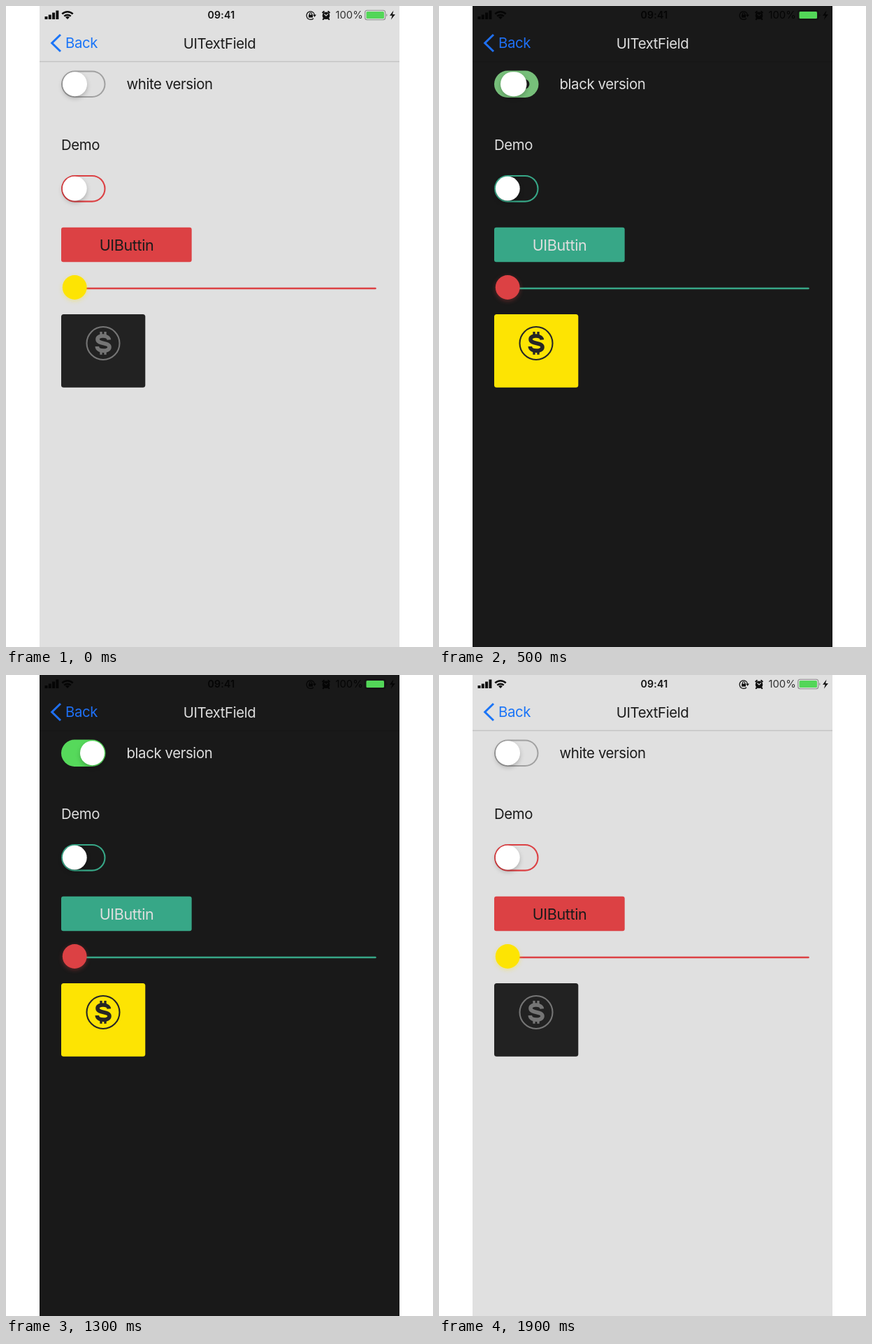
These frames come from a looping animation (611 by 917 pixels, 2 s). An HTML page:

```html
<!DOCTYPE html>
<html lang="en">
<head>
<meta charset="utf-8">
<title>Theme switch</title>
<style>
html, body { margin: 0; width: 100%; height: 100%; overflow: hidden; background: #fff; }
svg {
  display: block;
  --bg: #e0e0e0; --line: #c3c3c3; --ink: #1b1b1b; --link: #1b75f7;
  --accent: #dc4144; --thumb: #fde403; --card: #222; --icon: #757575;
  --status: #111; --percent: #333; --case: #8c8c8c;
}
svg.dark {
  --bg: #191919; --line: #171717; --ink: #dedede; --link: #1f70f5;
  --accent: #37a787; --thumb: #dc4144; --card: #fde403; --icon: #262626;
  --status: #050505; --percent: #050505; --case: #111;
}
text { font: 20.4px Inter, Roboto, sans-serif; letter-spacing: -.4px; fill: var(--ink); }
.mid { text-anchor: middle; }
.page { fill: var(--bg); }
.accent { fill: var(--accent); }
.knob { fill: #fff; filter: drop-shadow(0 3px 3px rgba(0, 0, 0, .22)); }
.thumb { fill: var(--thumb); filter: drop-shadow(0 2px 3px color-mix(in srgb, var(--thumb) 35%, transparent)); }
.status { fill: var(--status); stroke: none; }
.ring { fill: none; stroke: var(--status); }
.icon { fill: none; stroke: var(--icon); }
</style>
</head>
<body>
<svg id="stage" width="611" height="917" viewBox="0 0 611 917">
  <rect class="page" x="48" width="515" height="917"/>
  <path d="M48 79.5H563" stroke="var(--line)" stroke-width="1.4"/>

  <!-- status bar -->
  <path class="status" d="M55.5 15h4v4h-4zM60.8 12.5h4v6.5h-4zM66.1 9.5h4v9.5h-4zM71.4 6.5h4v12.5h-4z"/>
  <g class="ring" stroke-width="2.5">
    <path d="M80.3 11.4A11 11 0 0 1 95.7 11.4M83.3 14.6A6.8 6.8 0 0 1 92.7 14.6"/>
  </g>
  <path class="status" d="M88 19l-2.8-2.8a4 4 0 0 1 5.6 0z"/>
  <text class="mid" x="308" y="18" style="font-size:14.2px;font-weight:600;letter-spacing:.2px;fill:var(--status)">09:41</text>
  <path class="ring" stroke-width="1.3" d="M440 17.7A5.8 5.8 0 1 1 441.6 13"/>
  <path class="status" d="M439 12.6h5l-2.5 3.2zM433 12.6h6v4h-6z"/>
  <path class="ring" stroke-width="1.1" d="M434.3 13v-1.6a1.7 1.7 0 0 1 3.4 0V13"/>
  <circle class="status" cx="458" cy="13.7" r="5.3"/>
  <path class="ring" stroke-width="2.2" stroke-linecap="round" d="M453.3 9.3l1.5-1.3M462.7 9.3l-1.5-1.3M454.8 18l-1 1M461.2 18l1 1"/>
  <path d="M455.5 11.5l2.5 2.4 2.8-2.6" fill="none" stroke="var(--bg)" stroke-width="1.1"/>
  <text x="471.5" y="18" style="font-size:14.8px;letter-spacing:0;fill:var(--percent)">100%</text>
  <rect x="513.7" y="6.2" width="29" height="13.6" rx="3" fill="none" stroke="var(--case)" stroke-width="1.1"/>
  <rect x="515.5" y="8" width="25.5" height="10" rx="1.5" fill="#53d658"/>
  <path d="M544.2 11v4a2.2 2.2 0 0 0 0-4z" fill="var(--case)"/>
  <path class="status" d="M554.5 6.5l-5.5 7.3h3.6l-1.7 5.7 6-7.6h-3.8z"/>

  <!-- navigation -->
  <path d="M78 41L65.7 53 78 65" fill="none" stroke="var(--link)" stroke-width="3"/>
  <text x="85" y="60" style="fill:var(--link)">Back</text>
  <text class="mid" x="305.5" y="60.5">UITextField</text>

  <!-- theme switch -->
  <rect id="track" x="79" y="92.5" width="63.5" height="38.5" rx="19.25"/>
  <rect id="hole" class="page" x="81" y="94.5" width="59.5" height="34.5" rx="17.25"/>
  <rect id="knob" class="knob" y="94.2" height="35" rx="17.5"/>
  <text id="label" x="172.5" y="119"></text>
  <text x="79" y="206">Demo</text>

  <!-- themed controls -->
  <rect class="page" x="80.1" y="243" width="61.4" height="36.6" rx="18.3" stroke="var(--accent)" stroke-width="2.1"/>
  <circle class="knob" cx="98.3" cy="261.2" r="17.4"/>
  <rect class="accent" x="79" y="316.7" width="186.7" height="49.6" rx="3"/>
  <text class="mid" x="172.5" y="349.5" style="font-size:21.6px">UIButtin</text>
  <path d="M98 404H528.5" stroke="var(--accent)" stroke-width="2.6" stroke-linecap="round"/>
  <circle class="thumb" cx="98.2" cy="402.5" r="17.4"/>

  <!-- coin card -->
  <rect x="79" y="441" width="120.3" height="104.7" rx="3.5" fill="var(--card)"/>
  <g class="icon">
    <circle cx="139" cy="482.5" r="23.5" stroke-width="2.1"/>
    <path stroke-width="5.6" d="M147.4 477.5C147 470.8 131 470 131 476.7C131 484.5 148 480.5 148 488C148 495 130.5 495 130.3 487"/>
    <path stroke-width="3.3" d="M136 466v6M142 466v6M136 493v5.7M142 493v5.7"/>
  </g>
</svg>
<script>
const LOOP = 2000, STEP = 100, DARK_AT = 5, LIGHT_AT = 14;
// Each pose: knob left edge, knob width, green share, scale of the hollow
const turnOn = [[88, 37.5, .55, .4], [103, 36.5, .9, .08], [105.5, 35, 1, 0], [106, 35, 1, 0]];
const turnOff = [[86.7, 35, .13, .4], [82, 35, .02, .85], [81.2, 35, 0, .98], [81, 35, 0, 1]];
const OFF = [160, 160, 160], ON = [86, 217, 91];
const byId = id => document.getElementById(id);
const [stage, track, hole, knob, label] = ["stage", "track", "hole", "knob", "label"].map(byId);

function draw(now) {
  const step = Math.floor(now % LOOP / STEP);
  const dark = step >= DARK_AT && step < LIGHT_AT;
  const poses = dark ? turnOn : turnOff;
  const age = dark ? step - DARK_AT : (step - LIGHT_AT + 20) % 20;
  const [left, width, green, scale] = poses[Math.min(age, poses.length - 1)];

  stage.classList.toggle("dark", dark);
  label.textContent = dark ? "black version" : "white version";
  knob.setAttribute("x", left);
  knob.setAttribute("width", width);
  track.setAttribute("fill", `rgb(${OFF.map((c, i) => Math.round(c + (ON[i] - c) * green))})`);
  hole.setAttribute("transform", `translate(122 111.75) scale(${scale}) translate(-122 -111.75)`);
}

const start = performance.now();
function tick() {
  draw(performance.now() - start);
  requestAnimationFrame(tick);
}
tick();
</script>
</body>
</html>
```
